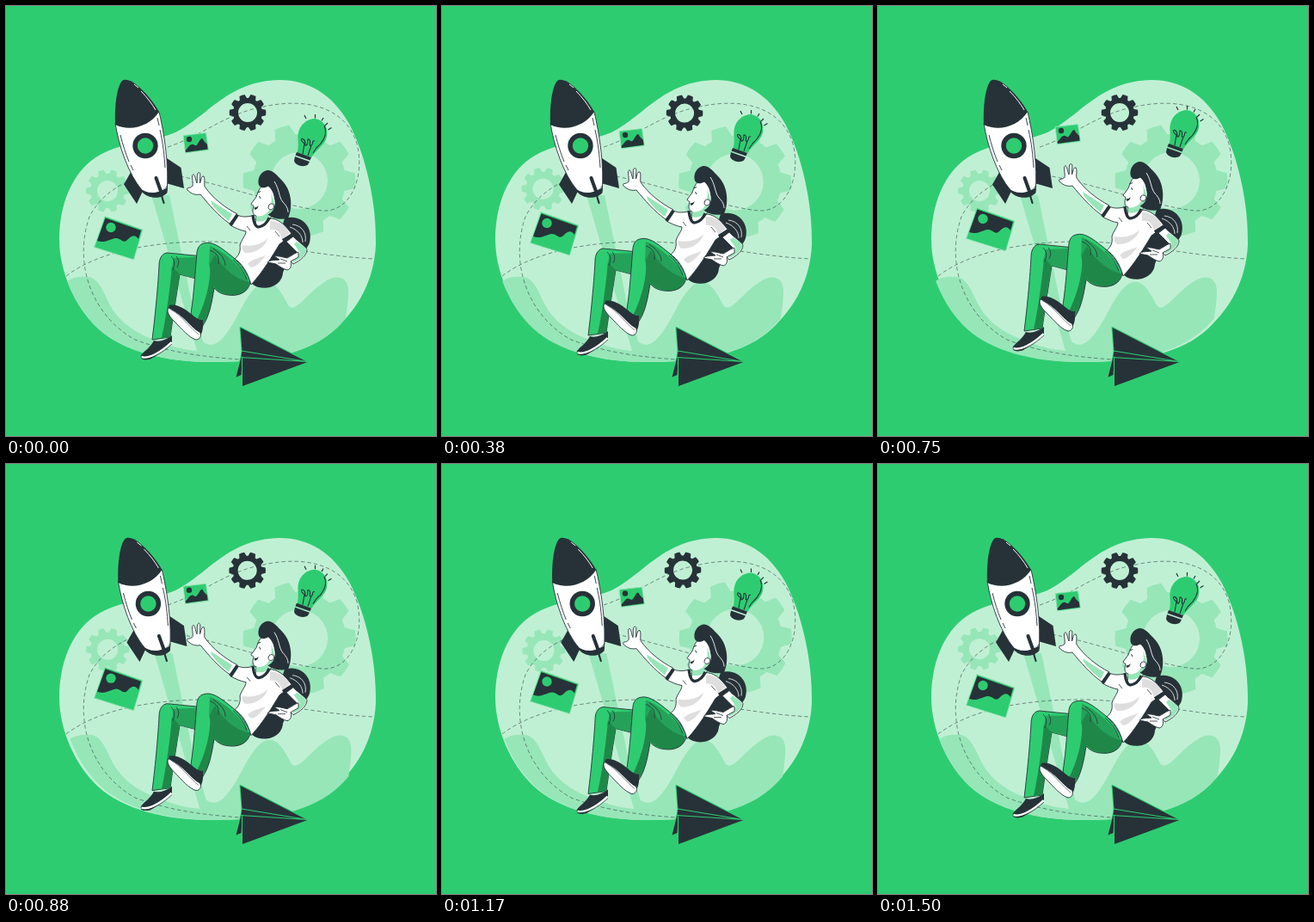
Animation, 500 px wide and 500 px high, one loop 1.54 s. Source, as an HTML page with a canvas:

```html
<!DOCTYPE html>
<html lang="en">
<head>
<meta charset="utf-8">
<title>Rocket launch</title>
<style>
  html, body { margin: 0; width: 100%; height: 100%; overflow: hidden; background: #2ecc71; }
  canvas { display: block; width: 500px; height: 500px; }
</style>
</head>
<body>
<canvas id="stage" width="500" height="500"></canvas>
<script>
const ctx = document.getElementById('stage').getContext('2d');
const GREEN = '#2ecc71', PALE = '#c0f0d4', MID = '#97e6b8', SHADE = '#1f8849', DIM = '#25a259';
const INK = '#263238', WHITE = '#fff', GREY = '#dedede';
const LOOP = 1540, CYCLE = 1500, FPS = 24, TAU = Math.PI * 2;

function fill(d, color, outline) {
  ctx.fillStyle = color;
  ctx.fill(new Path2D(d));
  if (outline) stroke(d, outline === true ? INK : outline, 0.9);
}

function stroke(d, color = INK, width = 1) {
  ctx.strokeStyle = color;
  ctx.lineWidth = width;
  ctx.stroke(new Path2D(d));
}

function disc(x, y, r, color) {
  ctx.fillStyle = color;
  ctx.beginPath();
  ctx.arc(x, y, r, 0, TAU);
  ctx.fill();
}

function moved(x, y, draw) {
  ctx.save();
  ctx.translate(x, y);
  draw();
  ctx.restore();
}

// All gears rock together around one pivot.
function swayed(angle, draw) {
  ctx.save();
  ctx.translate(250, 185);
  ctx.rotate(angle);
  ctx.translate(-250, -185);
  draw();
  ctx.restore();
}

function gear(x, y, body, tip, hole, toothWidth, color) {
  moved(x, y, () => {
    const root = toothWidth * 0.58 / body, crown = toothWidth * 0.42 / tip;
    ctx.beginPath();
    for (let i = 0; i < 10; i++) {
      const a = i * TAU / 10;
      ctx.arc(0, 0, body, a - TAU / 10 + root, a - root);
      ctx.arc(0, 0, tip, a - crown, a + crown);
    }
    ctx.closePath();
    ctx.moveTo(hole, 0);
    ctx.arc(0, 0, hole, 0, TAU);
    ctx.fillStyle = color;
    ctx.fill('evenodd');
  });
}

const BLOB = 'M318 86C352 86 380 103 399 137C419 175 431 230 430 278C428 318 411 349 385 374' +
  'C353 405 300 414 240 414C185 414 137 402 107 375C80 350 62 308 62 272C62 230 77 195 103 177' +
  'C133 157 165 160 197 147C235 128 258 87 318 86Z';

// Horizontal jolts at every tenth of the cycle.
const JOLTS = [0, -1, 2, -4, 4, -4, 4, -4, 2, -1, 0];
function shakeAt(phase) {
  const i = Math.min(9, Math.floor(phase * 10));
  const f = phase * 10 - i;
  return JOLTS[i] + (JOLTS[i + 1] - JOLTS[i]) * f * f * (3 - 2 * f);
}

const floatAt = phase => -10 * (1 - Math.abs(1 - 2 * phase));

// Linear swing of one degree either way.
const swayAt = phase => Math.asin(Math.sin(phase * TAU)) / 90;

function hills() {
  ctx.save();
  ctx.clip(new Path2D(BLOB));
  fill('M60 330C72 315 84 314 96 315C108 317 113 332 120 346C128 362 142 374 160 383' +
    'C182 393 205 400 222 401L226 388C234 395 241 396 249 389C268 371 277 336 294 324' +
    'C311 312 321 335 329 349C337 357 350 334 370 321C385 311 397 315 398 330' +
    'C398 345 396 354 394 372L390 420H60Z', MID);
  ctx.restore();
  fill('M169 220L190 220L216 345L230 393L222 401Z', MID);
}

function trails() {
  ctx.save();
  ctx.setLineDash([4.5, 3]);
  ctx.globalAlpha = 0.6;
  stroke('M70 314C110 283 180 273 243 274C310 276 365 291 428 294', INK, 0.9);
  stroke('M188 164C230 150 255 125 300 117C350 106 395 118 408 160C418 200 400 240 368 238' +
    'C320 233 240 203 190 196C150 192 112 215 97 245C78 300 100 360 150 388C190 403 230 408 272 411', INK, 0.9);
  ctx.restore();
}

function pictures() {
  fill('M115 244.5L159 260L148.5 295L102.5 280.5Z', GREEN, MID);
  fill('M115.5 246.5L157 261L154 271C149 264 145 268 141 272C136 277 133 269 127 270C119 272 114 276 106 273Z', INK);
  disc(122, 257.5, 5.7, GREEN);
  fill('M206 150.5L232.5 147.5L235.5 167.5L208.5 171Z', GREEN, MID);
  fill('M208.5 168C212 165 213 161 216 161C219 160 220 165 223 160C226 155 228 151 230 157L234 161L234.5 166.5L209 170Z', INK);
  disc(213, 155, 3.2, INK);
}

function bulb() {
  fill('M338.5 171C341 162 339 157 339.5 150C341 137 351 131 359 131C369 132 375 141 373 152C371 162 361 166 355.5 176Z', GREEN);
  stroke('M370 139C375 150 367 160 361 165L357 171', INK, 1.1);
  stroke('M345 172L347 160C342 156 343 153 346 155C350 158 346 163 349 162' +
    'C353 160 349 154 352 155C356 157 351 164 355 162C358 160 355 156 359 157M355 162L351 174', INK, 1.1);
  fill('M338 170L355 176L353.5 179.5L336.5 173.5Z', INK);
  fill('M336 175L353 181L351 184.5C346 188 337 186 335 180Z', INK);
  stroke('M347 127L349 131M359.5 126V130.5M369 130L367 133.5M374 136L371 139M378.5 141.5L374.5 144', INK, 1.2);
}

function rocket() {
  fill('M148 188L137 207.5L152 230L161 211Z', INK);
  fill('M187 177L203.5 188L207 212L186 206Z', INK);
  fill('M127 136C131 162 142 195 158 214C165 222 179 224 187 215C190 188 184 148 178 123Z', WHITE, true);
  fill('M155 211C164 220 180 219 188 208L187.5 217C180 226 164 224 157 215Z', INK);
  stroke('M158 212C166 217 178 217 187 211', WHITE, 0.8);
  fill('M127 138C126 115 129 94 135 87C139 84 146 87 151 91C163 101 171 111 178 123C168 139 145 147 127 138Z', INK);
  stroke('M149 91L154 95M157 99C164 106 170 114 174 121', WHITE, 1);
  stroke('M133 150C136 162 139 171 143 181M145 185L148 191M176 130L178 139M179 144C183 161 184 174 185 188', INK, 0.9);
  disc(162, 162.5, 14.7, INK);
  disc(162, 162.5, 9.2, GREEN);
  ctx.lineCap = 'round';
  stroke('M174.5 200L181 218', INK, 4);
  stroke('M179 214L183.5 229', INK, 2.2);
  ctx.lineCap = 'butt';
}

function legs() {
  // far leg
  fill('M187 287C199 288 216 290 230 291L232 320L202 312C198 337 194 363 191 385L170 388C174 356 177 322 178 302C178 294 181 288 187 287Z', GREEN, true);
  fill('M195 293L224 292L229 319L202 312L192 308Z', DIM);
  fill('M193 303L202 312C198 337 194 363 191 385L181 386C187 358 191 325 193 303Z', SHADE);
  stroke('M192 291C196 295 197 300 194 307M198 291C202 296 201 300 199 304', INK, 0.8);
  fill('M172 389C178 391 187 388 193 383L193 391C187 398 175 406 169 410C162 413 155 411 157 406C161 401 168 397 172 389Z', INK);
  stroke('M157.5 408C166 411 181 402 192.5 391', WHITE, 2.4);
  stroke('M157 409.5C165 414 181 404 193 393', INK, 0.7);

  // near leg
  const near = 'M230 276C239 273 249 280 260 289C270 296 279 308 284 320C283 333 270 338 258 336C249 335 245 331 242 328' +
    'C239 347 236 362 228 373L215 358C219 331 220 308 222 286C223 281 225 277 230 276Z';
  fill(near, GREEN);
  fill('M237 279C252 284 273 302 283 321L262 336L242 327L236 301Z', DIM);
  fill('M243 289C250 302 266 318 283 321C282 335 267 338 256 335C248 333 245 330 242 327' +
    'C239 347 236 362 228 371L222 365C231 347 239 321 237 300Z', SHADE);
  stroke(near, INK, 0.9);
  stroke('M237 284C246 287 248 293 247 300M241 282C251 289 255 295 255 302M264 295C271 301 277 309 280 318', INK, 0.8);
  fill('M190 348C197 346 207 351 215 358C220 362 225 366 229 365C230 374 228 382 224 386C211 378 199 362 188 355Z', INK);
  fill('M189 351C186 355 190 361 196 367C204 375 213 386 221 388C226 388 228 382 225 379C217 376 207 359 189 351Z', WHITE, true);
  stroke('M192 353C204 360 214 374 224 382', INK, 0.6);
}

function ponytail() {
  fill('M324 247C343 241 358 257 353 275C349 289 328 294 322 310C321 327 298 333 286 323C287 310 298 294 312 283Z', INK);
  stroke('M333 254C344 255 350 264 348 274M330 257C339 260 345 267 345 275', WHITE, 0.8);
}

function reachingArm() {
  fill('M269 242C254 234 241 224 231 210C230 207 232 201 230 198C227 197 227 203 225.5 206' +
    'C225 201 227 194 224.5 193.5C221 194 223 201 222 206C220 202 220 195 217.5 196' +
    'C215 197 218 204 217 209C214 213 209 210 211 214C216 219 221 220 226 219C236 231 247 244 260 253Z', WHITE, true);
  fill('M238 226L263 242L259 250C251 244 245 238 239 230Z', MID);
}

function restingArm() {
  fill('M334 268C339 274 347 278 350 283C350 290 342 296 334 300L327 292L340 288L326 274Z', WHITE, true);
  fill('M338 274C344 278 349 280 349 285C347 291 340 296 334 298L332 294L342 287L335 277Z', MID);
  fill('M340 286C334 288 330 292 327 293C321 292 316 290 312 291L318 295C312 296 307 295 304 298' +
    'L314 300C318 303 323 306 327 307C332 306 332 300 331 297L340 292Z', WHITE, true);
  stroke('M316 299L325 299M319 294L327 297', INK, 0.8);
}

function torso() {
  fill('M269 243C275 246 281 245 286 244C292 253 300 253 306 247C315 247 323 252 333 266L322 274L318 277' +
    'C310 290 299 309 285 324C281 309 274 299 266 294C271 290 273 285 272 278C274 271 279 267 279 262C273 261 266 258 261 255Z', WHITE, true);
  fill('M275 278C284 280 297 278 304 270C302 280 290 288 278 287C275 285 274 282 275 278Z', GREY);
  fill('M281 300C286 294 295 293 302 290C296 298 290 304 285 304Z', GREY);
  fill('M307 250C317 249 325 256 330 264L321 271C319 264 316 259 307 260Z', GREY);
  stroke('M269 243L261 255', INK, 4);
  stroke('M322 273L333 266', INK, 4);
  stroke('M313 262L318 268M280 256L284 261', INK, 0.8);
}

function head() {
  fill('M300 208C294 211 293 217 291 222L285 230C285 232 288 231 288 233C286 239 287 243 291 244' +
    'L290 254C294 259 302 256 307 248L314 232L310 210Z', WHITE, true);
  fill('M308 217C310 228 308 236 303 241C299 244 295 245 291 244L290.5 250C297 252 304 249 307 245L313 232Z', MID);
  fill('M294.5 209C291 201 297 191 305 191C312 192 316 198 321 203C332 214 334 233 328 247' +
    'C319 249 310 247 304.5 242.5C311 240 313 233 313 226C312 219 309 213 305 209.5C301 212 297 212 294.5 209Z', INK);
  stroke('M312 204C318 213 317 222 322 228C326 232 328 236 328 240', WHITE, 0.9);
  fill('M306 231C310 228 313 232 311 235C309 238 305 237 305 234Z', WHITE, true);
  fill('M288.5 234C290 234.5 292 234 293.5 232C293.5 235 291 237.5 289 236.5Z', INK);
  stroke('M294.5 221L296 224M292.5 217L296 215.5', INK, 1);
  stroke('M287 243C288 253 290 257 294 257C300 256 304 251 306 246', INK, 3.2);
}

function woman() {
  ponytail();
  legs();
  reachingArm();
  torso();
  restingArm();
  head();
}

function plane() {
  const outline = 'M272.5 374L350.5 414L275 442V409L273.5 429L267.5 431.5L273.5 408L274.5 401Z';
  stroke(outline, GREEN, 2);
  fill(outline, INK);
  stroke('M274 401L350 413.5L273 408.5M274.5 409V430', GREEN, 1.1);
}

function render(now) {
  const frame = Math.floor(((now % LOOP) + 4.9) * FPS / 1000);
  const phase = (frame * 1000 / FPS / CYCLE) % 1;
  const shake = shakeAt(phase), lift = floatAt(phase), sway = swayAt(phase);

  ctx.lineCap = 'butt';
  ctx.lineJoin = 'round';
  ctx.fillStyle = GREEN;
  ctx.fillRect(0, 0, 500, 500);
  fill(BLOB, PALE);
  swayed(sway, () => {
    gear(341, 203, 54, 65.5, 33, 21, MID);
    gear(118, 215, 20, 25, 12, 8, MID);
  });
  moved(shake, 0, hills);
  trails();
  swayed(sway, () => gear(281, 124, 17, 21.3, 11, 7.5, INK));
  moved(0, lift, () => { pictures(); bulb(); });
  moved(shake, 0, rocket);
  moved(0, lift, woman);
  plane();
}

const start = performance.now();
function tick() {
  render(performance.now() - start);
  requestAnimationFrame(tick);
}
tick();
</script>
</body>
</html>
```
